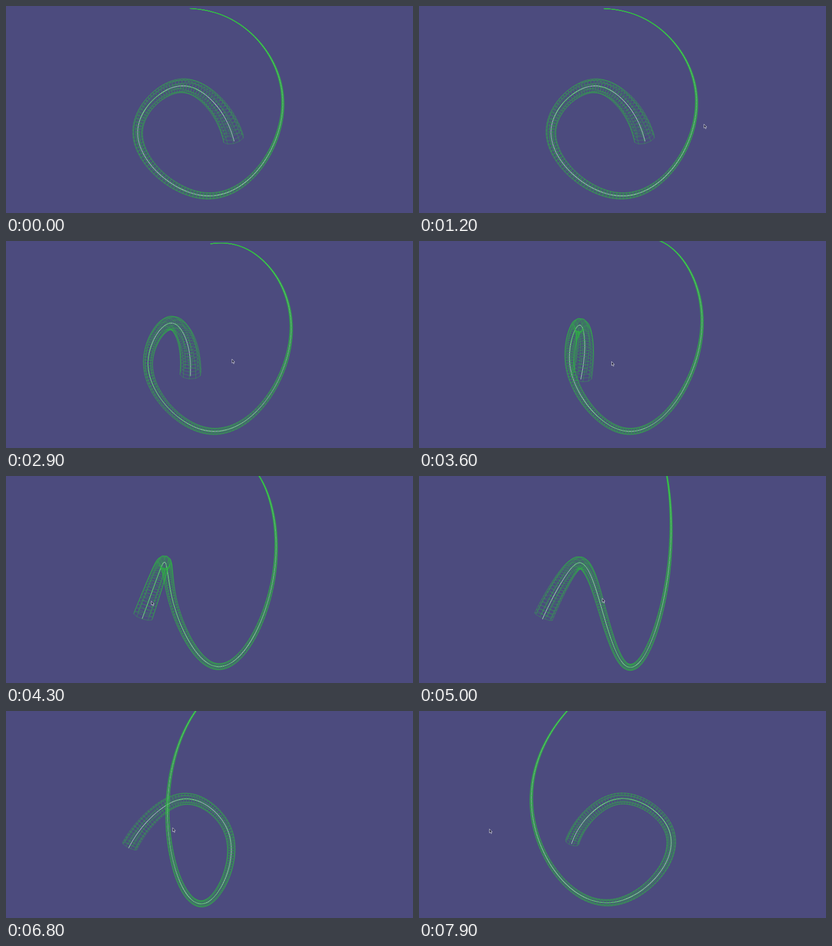
An HTML page that plays this animation: 726 by 370 pixels, repeating every 8000 ms.

```html
<!DOCTYPE html>
<html lang="en">
<head>
<meta charset="utf-8">
<title>Rotating wireframe horn</title>
<style>
  html, body { margin: 0; width: 100%; height: 100%; overflow: hidden; background: #4c4b7e; }
  svg { display: block; width: 726px; height: 370px; }
  path { fill: none; stroke-linejoin: round; }
  .axis { stroke: #b4dcc4; stroke-width: 1.2; opacity: .85; }
  .ring { stroke: #2fae48; stroke-width: .8; opacity: .6; }
  .rail { stroke: #2cc23c; stroke-width: .75; opacity: .55; }
  .cursor { fill: #24243c; stroke: #c4c4d4; stroke-width: .9; }
</style>
</head>
<body>
<svg id="stage" viewBox="0 0 726 370"></svg>
<script>
const LOOP = 8000, STEP = 100;
const CENTER = { x: 350, y: 185 }, CAMERA = 600;
const SIDES = 10, RINGS = 172, MOUTH = 14.6, TAPER = 1.6;
const TURN_PER_PIXEL = .225 * Math.PI / 180;

// Spine of the horn, one point per bend: x, y (down), z (towards the viewer).
const BENDS = [
  [43, 59, 130], [14, -1, 94], [-35, -31, 57], [-114, 36, 0],
  [4, 152, -16], [150, -3, -28], [92, -169, -55], [-27, -237, -101]
];

const add = (a, b, k = 1) => a.map((v, i) => v + b[i] * k);
const scale = (a, k) => a.map(v => v * k);
const dot = (a, b) => a[0] * b[0] + a[1] * b[1] + a[2] * b[2];
const unit = a => scale(a, 1 / Math.hypot(...a));
const cross = (a, b) => [
  a[1] * b[2] - a[2] * b[1],
  a[2] * b[0] - a[0] * b[2],
  a[0] * b[1] - a[1] * b[0]
];
const between = (a, b, f) => add(a, add(b, a, -1), f);
const distance = (a, b) => Math.hypot(...add(a, b, -1));

// Cubic spline with continuous curvature; its tangents are found by relaxation.
function smoothCurve(points, detail) {
  const last = points.length - 1;
  const spans = points.slice(1).map((p, i) => distance(p, points[i]));
  const slopes = spans.map((h, i) => scale(add(points[i + 1], points[i], -1), 1 / h));
  const tangents = points.map((_, i) => slopes[Math.min(i, last - 1)]);
  for (let pass = 0; pass < 60; pass++) {
    for (let i = 1; i < last; i++) {
      const h = spans[i - 1], g = spans[i];
      tangents[i] = points[i].map((_, k) =>
        (3 * (g * slopes[i - 1][k] + h * slopes[i][k]) -
         g * tangents[i - 1][k] - h * tangents[i + 1][k]) / (2 * (g + h)));
    }
    tangents[0] = add(scale(slopes[0], 2), tangents[1], -1);
    tangents[last] = add(scale(slopes[last - 1], 2), tangents[last - 1], -1);
  }
  const curve = [points[0]];
  for (let i = 0; i < last; i++) {
    for (let j = 1; j <= detail; j++) {
      const f = j / detail, e = 1 - f, h = spans[i];
      let p = scale(points[i], e * e * (1 + 2 * f));
      p = add(p, points[i + 1], f * f * (3 - 2 * f));
      p = add(p, tangents[i], h * f * e * e);
      curve.push(add(p, tangents[i + 1], -h * f * f * e));
    }
  }
  return curve;
}

function spaceEvenly(curve, count) {
  const along = [0];
  for (let i = 1; i < curve.length; i++) along.push(along[i - 1] + distance(curve[i - 1], curve[i]));
  const total = along[along.length - 1];
  let k = 0;
  return Array.from({ length: count }, (_, i) => {
    const goal = total * i / (count - 1);
    while (k < curve.length - 2 && along[k + 1] < goal) k++;
    return between(curve[k], curve[k + 1], (goal - along[k]) / (along[k + 1] - along[k]));
  });
}

// Rings are carried along the spine without twisting.
function buildRings(spine) {
  const last = spine.length - 1;
  let normal = [0, 0, 1];
  return spine.map((p, i) => {
    const tangent = unit(add(spine[Math.min(i + 1, last)], spine[Math.max(i - 1, 0)], -1));
    normal = unit(add(normal, tangent, -dot(normal, tangent)));
    const side = cross(tangent, normal);
    const radius = MOUTH * Math.pow(1 - i / last, TAPER) + .1;
    return Array.from({ length: SIDES }, (_, s) => {
      const a = 2 * Math.PI * s / SIDES;
      return add(add(p, normal, radius * Math.cos(a)), side, radius * Math.sin(a));
    });
  });
}

const spine = spaceEvenly(smoothCurve(BENDS, 60), RINGS);
const rings = buildRings(spine);
const axis = [between(spine[1], spine[0], 1.7), ...spine];

const stage = document.getElementById('stage');
function addPath(name) {
  const path = document.createElementNS('http://www.w3.org/2000/svg', 'path');
  path.setAttribute('class', name);
  return stage.appendChild(path);
}
const axisPath = addPath('axis');
const ringPath = addPath('ring');
const railPaths = Array.from({ length: SIDES }, () => addPath('rail'));
const cursor = addPath('cursor');
cursor.setAttribute('d', 'M0 0V7.2L1.7 5.7L3 8.5L4.1 8L2.9 5.3H5.1Z');

const progress = (t, from, to) => Math.min(1, Math.max(0, (t - from) / (to - from)));
const ease = f => f * f * (3 - 2 * f);

// The pointer drags the model left, moves back, and drags it left again.
function poseAt(time) {
  const f = progress(time, 1100, 4700);
  const first = .65 * f + .35 * f ** 4;
  const back = progress(time, 4700, 5400);
  const second = progress(time, 5475, LOOP);
  const lift = ease(progress(time, 2900, 5000));
  const drag = 320 * first + 394 * second;
  return {
    yaw: drag * TURN_PER_PIXEL,
    pitch: -.14 + .12 * lift + .03 * second,
    x: 514 - drag + 310 * back,
    y: 211 + 17 * lift - 22 * back + 5 * second
  };
}

function projector(yaw, pitch) {
  const c = Math.cos(yaw), s = Math.sin(yaw);
  const cp = Math.cos(pitch), sp = Math.sin(pitch);
  return ([x, y, z]) => {
    const depth = z * c + x * s;
    const zoom = CAMERA / (CAMERA - depth * cp + y * sp);
    return (CENTER.x + zoom * (x * c - z * s)).toFixed(1) + ' ' +
           (CENTER.y + zoom * (y * cp + depth * sp)).toFixed(1);
  };
}

const line = points => 'M' + points.join('L');

function draw(time) {
  const pose = poseAt(time);
  const project = projector(pose.yaw, pose.pitch);
  const flat = rings.map(ring => ring.map(project));
  axisPath.setAttribute('d', line(axis.map(project)));
  ringPath.setAttribute('d', flat.map(ring => line(ring) + 'Z').join(''));
  railPaths.forEach((path, s) => path.setAttribute('d', line(flat.map(ring => ring[s]))));
  cursor.setAttribute('transform', `translate(${pose.x.toFixed(1)} ${pose.y.toFixed(1)})`);
  cursor.setAttribute('visibility', time < 1000 ? 'hidden' : 'visible');
}

const start = performance.now();
function frame() {
  const time = (performance.now() - start) % LOOP;
  draw(Math.floor(time / STEP) * STEP);
  requestAnimationFrame(frame);
}
frame();
</script>
</body>
</html>
```
